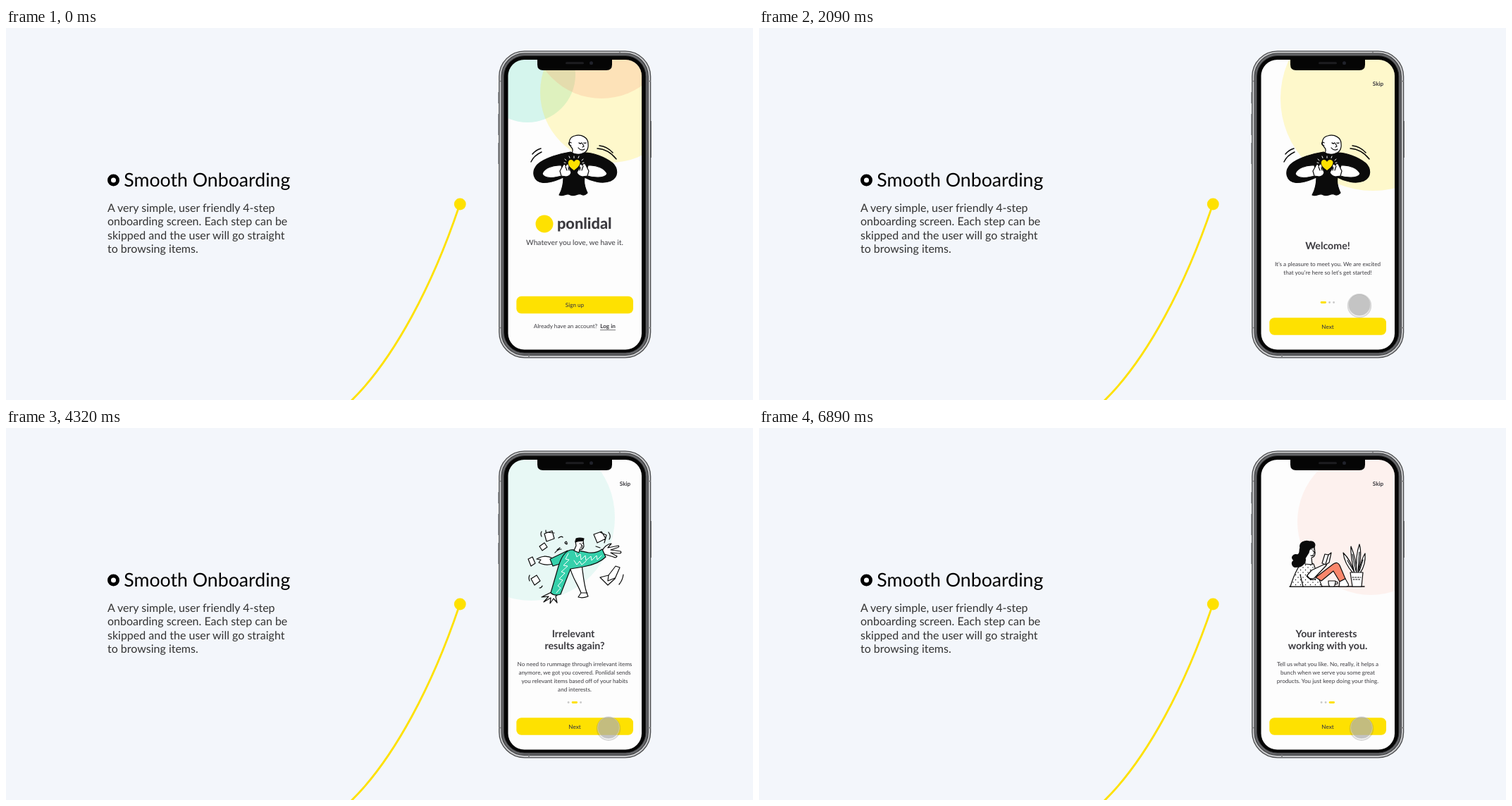
These frames come from a looping animation (1060 by 528 pixels, 8000 ms). An HTML page:

```html
<!DOCTYPE html>
<html lang="en">
<head>
<meta charset="utf-8">
<title>Smooth Onboarding</title>
<style>
  html, body { margin: 0; width: 100%; height: 100%; overflow: hidden; background: #f3f6fb; }
  svg { display: block; width: 1060px; height: 528px; font-family: Lato, "Open Sans", sans-serif; text-rendering: geometricPrecision; }
  .title { font-size: 26.7px; }
  .intro { font-size: 16px; fill: #333; }
  .screen text { fill: #3c3b40; text-anchor: middle; }
  .head { font-size: 14.2px; font-weight: 700; }
  .body { font-size: 8.15px; }
  .small { font-size: 8.15px; font-weight: 500; }
  .bold { font-size: 8.15px; font-weight: 700; }
  .art { fill: none; stroke: #0b0b0b; stroke-width: 1.2; stroke-linecap: round; stroke-linejoin: round; }
  .art .ink { fill: #0b0b0b; }
  .art .paper { fill: #fff; }
  .art .green { fill: #35d0ab; }
  .art .coral { fill: #f9866b; }
  .art .chalk { stroke: #fff; stroke-width: 1; }
</style>
</head>
<body>
<svg viewBox="0 0 1060 528">
  <defs>
    <clipPath id="glass"><rect x="712.5" y="45" width="189.5" height="411.5" rx="23"/></clipPath>
    <pattern id="spots" width="7" height="7" patternUnits="userSpaceOnUse">
      <rect width="7" height="7" fill="#fff"/>
      <circle cx="2" cy="2" r=".75" fill="#0b0b0b"/><circle cx="5.5" cy="5.5" r=".75" fill="#0b0b0b"/>
    </pattern>
  </defs>

  <rect width="1060" height="528" fill="#f3f6fb"/>
  <circle cx="152.5" cy="216" r="6" fill="#fff" stroke="#000" stroke-width="5"/>
  <text class="title" x="167.3" y="225.2">Smooth Onboarding</text>
  <g class="intro">
    <text x="144" y="261">A very simple, user friendly 4-step</text>
    <text x="144" y="280.3">onboarding screen. Each step can be</text>
    <text x="144" y="299.7">skipped and the user will go straight</text>
    <text x="144" y="319">to browsing items.</text>
  </g>
  <path d="M490 529C551 469 606 364 644 250" fill="none" stroke="#fee101" stroke-width="2.8"/>
  <circle cx="644.3" cy="250" r="8.4" fill="#fee101"/>

  <!-- phone body -->
  <g fill="none">
    <path d="M699 91v16M699 122v30M699 163v30M915.3 132v52" stroke="#6d6e72" stroke-width="1.2"/>
    <rect x="699.8" y="32.8" width="214.8" height="435" rx="36" fill="#c9cacc" stroke="#4a4b4d" stroke-width="1.3"/>
    <rect x="703.2" y="36.2" width="208" height="428.2" rx="32.5" fill="#66676a" stroke="#3c3d3f" stroke-width="1.2"/>
    <path d="M699 75.5h4M699 425.5h4M911 75.5h4M911 425.5h4M871 32v4M742 464v4" stroke="#77787a" stroke-width="1.5"/>
    <rect x="706.6" y="39.6" width="201.2" height="421.4" rx="29" fill="#050505" stroke="#2a2a2b"/>
  </g>

  <g class="screen" clip-path="url(#glass)">
    <rect x="712" y="45" width="191" height="412" fill="#fdfdfd"/>
    <circle class="splash" cx="740" cy="66" r="68" fill="#35d0ab" fill-opacity=".2"/>
    <circle id="blob"/>
    <circle class="splash" cx="845" cy=".5" r="99.5" fill="#f9866b" fill-opacity=".2"/>

    <!-- hugging man -->
    <g class="art">
      <path class="paper" d="M803 178C805 174 804 171 802 169C797 164 799 155 807 153C817 150 826 156 826 164C827 172 823 177 818 178L812 181Z"/>
      <path d="M802 163C798 160 797 166 802 167M813 163q2 2 4 0M820 163q2 1 3 0M818 164l2 4-2 1M812 170q4 5 9 2"/>
      <path class="ink" d="M801 176C788 178 764 184 754 194C745 204 748 218 762 219.5C775 220 785 214 791 212C791 221 789 230 785 237C792 240 795 233 801 237C807 240 811 234 816 236C819 238 822 237 825 234C821 226 820 217 821 212C830 217 846 222 858 217C870 211 868 199 861 192C850 183 832 177 822 177C815 180 807 180 801 176Z"/>
      <path class="paper" d="M761 207C763 199 776 194 788 195L792 209C781 212 765 216 761 207ZM853 207C850 199 838 194 826 195L821 209C831 212 849 215 853 207Z"/>
      <path class="paper" d="M786 203L791 194Q794 192 794 196L796 193Q799 193 799 197L802 205Q801 210 795 211L788 210ZM827 203L822 193Q819 191 818 195L816 193Q813 193 814 198L810 205Q812 210 818 211L825 210Z"/>
      <path d="M794 197l2 5M798 198l1 4M819 196l-2 6M815 198l-1 4"/>
      <path d="M806 202C801 198 797 195 798 190C799 186 804 186 806 190C808 186 813 186 814.5 190C815 195 810 199 806 202Z" fill="#fee101" stroke="none"/>
      <path class="chalk" d="M793 186l2 2M799 182l1 2.5M806 182v2.5M813 182l-1 2.5M819 186l-2 2M792 191l2 .5M820 191l-2 .5"/>
      <path stroke-width="1.5" d="M747 179Q752 173 759 171M745 190Q749 181 760 176M842 167Q853 168 861 177M839 171Q855 172 866 186"/>
    </g>

    <!-- man among flying papers -->
    <g class="art">
      <path class="paper" d="M764 150l11-4 3 11-11 4zM767 148l11 1M757 168l7-5 4 6-7 5zM741 186l6-3 4 9-6 4zM745 214l8-5 5 8-8 6zM834 151l11-4 6 10-12 6zM843 148l9 4-3 11M843 212l12-3 10-13 6 2-7 16-10 9z"/>
      <path d="M855 209l-1 8 10-4M766 148v-3M760 147q-2 3 0 7M855 148q4 5 1 10M837 168l6 2M784 156q4-3 6-1M743 209q-2 4 0 8M757 227q3 0 4-3M793 163q2-4 3 0t-3 0M876 208q-1 8-6 14M779 177q4-5 9-5M782 173l4-3"/>
      <path class="paper" d="M800 196C802 210 811 221 816 234L812 240Q818 242 826 239L824 234C820 222 819 208 817 194ZM817 234l8 0"/>
      <path class="paper" d="M776 185Q766 180 757 184l-4 2 6 1-3 4q9 5 20 2ZM846 174Q851 165 859 164l-5 6 15-3q2 2-2 3l-9 3 14 2q2 2-1 3l-13-1 9 5q-1 3-5 1l-13-4Z"/>
      <path class="paper" d="M776 232L760 240l10-1-7 8 10-6-1 8 5-7 5 6-2-9 4-4Z"/>
      <path class="green" d="M797 174L772 186L776 196L795 190Z"/>
      <path class="green" d="M801 173C810 172 820 176 827 177Q838 178 846 172L851 183C842 192 831 195 819 197L801 200L787 236Q778 239 773 234L784 196Q790 176 801 173Z"/>
      <path class="chalk" d="M798 178l-4 8 5 1-8 8 6 1-9 8 5 2-8 8 5 2-7 8 4 3-6 7M808 177l2 6 5-4 1 8 6-6 1 7 7-6 1 6 7-7 1 6 6-6M806 188l4 6 4-5 3 5 6-5"/>
      <path class="paper" d="M808 160L819 159L820 168Q818 174 814 172L813 177L806 174L809 167Z"/>
      <path class="ink" d="M808 162L809 157Q814 155 820 157L819 160L811 161Z"/>
      <path d="M814 164h1M818 163.5h.5M816 165l2 3-2 0M815 170h3"/>
    </g>

    <!-- reading woman -->
    <g class="art">
      <path d="M753 225H859" stroke-width="1.5"/>
      <path d="M769 192C762 202 757 215 754 225H799C795 216 791 204 787 193Q778 188 769 192Z" fill="url(#spots)"/>
      <path class="paper" d="M773 178L775 193L785 194L784 184Q789 183 789 178L788 167L778 166Z"/>
      <path class="ink" d="M768 170C766 162 775 159 781 161C788 160 791 166 787 170C783 170 781 171 780 177L775 185C777 191 770 198 764 197C757 199 754 191 759 188C754 184 758 178 764 180C769 178 766 174 768 170Z"/>
      <path d="M783 172h2M787 172h1M786 174l3 3-2 1M783 181q2 1 4-1"/>
      <path class="coral" d="M790 212L815 193Q821 189 824 195L832 214L824 218L815 203L798 217Z"/>
      <path class="paper" d="M824 218l8-4 4 7q2 4-3 4h-10ZM784 202L801 194L807 189L805 195L788 213Q780 216 778 209Z"/>
      <path class="paper" d="M799 192l4-13 5 1 4-3-3 14-5 3Z"/>
      <path d="M808 180l-4 13M768 208l4 17M777 210q7 8 13 4"/>
      <path class="paper" d="M808 217h10q0 8-3 8h-5q-2-1-2-8ZM818 218q4 0 3 3l-4 1"/>
      <path class="paper" d="M843 206C835 197 830 187 829 177C836 184 842 195 845 206C842 193 839 180 840 168C845 180 848 193 848 206C847 190 848 176 852 165C856 179 852 194 850 206C853 194 856 184 860 178C861 190 857 200 853 206Z"/>
      <path d="M844 203l-9-15M847 203l-5-24M850 203l2-27M852 203l5-16"/>
      <path class="paper" d="M839 205H857L855 225H842Z"/>
      <path d="M842 212h12M843 215h11" stroke-dasharray="2 1.8"/>
    </g>

    <g class="page">
      <circle cx="764" cy="278" r="12.5" fill="#fee101"/>
      <text x="820.8" y="285" font-size="21.8" font-weight="800">ponlidal</text>
      <text x="807" y="307.8" font-size="10.25">Whatever you love, we have it.</text>
      <text class="body" x="794" y="426.3">Already have an account?</text>
      <text class="bold" x="854" y="426.3">Log in</text>
      <path d="M843 428.6h22" stroke="#3c3b40" stroke-width=".7"/>
    </g>
    <g class="page">
      <text class="head" x="807" y="313.5">Welcome!</text>
      <g class="body">
        <text x="807" y="337.7">It’s a pleasure to meet you. We are excited</text>
        <text x="807" y="349.8">that you’re here so let’s get started!</text>
      </g>
    </g>
    <g class="page">
      <g class="head">
        <text x="805" y="297">Irrelevant</text>
        <text x="807" y="313.5">results again?</text>
      </g>
      <g class="body">
        <text x="807" y="337.7">No need to rummage through irrelevant items</text>
        <text x="807" y="349.8">anymore, we got you covered. Ponlidal sends</text>
        <text x="807" y="361.9">you relevant items based off of your habits</text>
        <text x="807" y="374">and interests.</text>
      </g>
    </g>
    <g class="page">
      <g class="head">
        <text x="805" y="297">Your interests</text>
        <text x="807" y="313.5">working with you.</text>
      </g>
      <g class="body">
        <text x="807" y="337.7">Tell us what you like. No, really, it helps a</text>
        <text x="807" y="349.8">bunch when we serve you some great</text>
        <text x="807" y="361.9">products. You just keep doing your thing.</text>
      </g>
    </g>

    <text id="skip" class="bold" x="878.5" y="82.3">Skip</text>
    <g id="button">
      <rect x="724.3" y="380.8" width="165.7" height="24.4" rx="7" fill="#fee101"/>
      <text id="signUp" class="small" x="807" y="396">Sign up</text>
      <text id="next" class="small" x="807" y="396">Next</text>
    </g>
  </g>

  <path d="M754 44H860V52Q860 60 852 60H762Q754 60 754 52Z" fill="#050505"/>
  <rect x="794" y="48.3" width="26" height="3" rx="1.5" fill="#1d1d20"/>
  <circle cx="830.5" cy="49.8" r="2.5" fill="#20222b"/>

  <g id="cursor">
    <circle cy="1.2" r="16.3" fill="none" stroke="#777" stroke-opacity=".28" stroke-width="1.8"/>
    <circle id="idle" r="15.6" fill="#aeaeae" fill-opacity=".73" stroke="#fff" stroke-opacity=".3" stroke-width=".8"/>
    <g id="pressed">
      <circle r="12.3" fill="none" stroke="#a8a278" stroke-opacity=".85" stroke-width="6.4"/>
      <circle r="9.2" fill="#d8c61c"/>
    </g>
  </g>
</svg>
<script>
  const LOOP = 8000;
  const SLIDE = 190;
  const SWITCHES = [1640, 3895, 6465];
  const SWITCH_TIME = 300;
  const PRESSES = [[1540, 1640], [3790, 3940], [6360, 6510]];
  const BLOBS = [ // cx, cy, r, opacity, red, green, blue
    [858, 91, 100, .2, 254, 225, 1],
    [871, 100, 131, .2, 254, 225, 1],
    [746, 127, 118, .1, 53, 208, 171],
    [868, 133, 104, .1, 249, 134, 107]
  ];

  const $ = id => document.getElementById(id);
  const all = selector => [...document.querySelectorAll(selector)];
  const clamp = v => Math.min(1, Math.max(0, v));
  const mix = (a, b, p) => a + (b - a) * p;
  const ease = (t, start, length) => {
    const p = clamp((t - start) / length);
    return p * p * (3 - 2 * p);
  };
  const set = (el, attrs) => {
    for (const name in attrs) el.setAttribute(name, attrs[name]);
  };

  const pages = all('.page'), arts = all('.art'), splashes = all('.splash');

  // Each onboarding page has three markers, the active one being a pill.
  pages.slice(1).forEach((page, active) => {
    let x = 796.7;
    for (let i = 0; i < 3; i++) {
      const width = i === active ? 8.3 : 2.8;
      const marker = document.createElementNS('http://www.w3.org/2000/svg', 'rect');
      set(marker, { x, y: 388, width, height: 2.9, rx: 1.4, fill: i === active ? '#fee101' : '#c9c9c9' });
      page.append(marker);
      x += width + 3.2;
    }
  });

  function drawBlob(step) {
    const from = Math.min(2, Math.floor(step));
    const [cx, cy, r, opacity, ...rgb] = BLOBS[from].map((v, i) => mix(v, BLOBS[from + 1][i], step - from));
    set($('blob'), { cx, cy, r, opacity, fill: `rgb(${rgb.map(Math.round)})` });
  }

  function drawCursor(t) {
    const enter = ease(t, 760, 570), down = ease(t, 2510, 490);
    const x = mix(884, 852, enter) + 3 * down - 4 * Math.sin(Math.PI * down);
    const y = mix(441, 393, enter) + 32.5 * down;
    const press = PRESSES.some(([start, end]) => t >= start && t < end);
    set($('cursor'), { transform: `translate(${x} ${y})`, opacity: clamp((t - 760) / 200) });
    set($('idle'), { opacity: press ? 0 : 1 });
    set($('pressed'), { opacity: press ? 1 : 0 });
  }

  function draw(t) {
    const step = SWITCHES.reduce((sum, start) => sum + ease(t, start, SWITCH_TIME), 0);
    const first = clamp(step);
    pages.forEach((page, i) => set(page, { opacity: clamp(1 - Math.abs(step - i)) }));
    arts.forEach((art, i) => {
      const offset = i + 1 - Math.max(1, step);
      set(art, { transform: `translate(${offset * SLIDE} 0)` });
    });
    splashes.forEach(splash => set(splash, { opacity: 1 - first }));
    set($('skip'), { opacity: first });
    set($('button'), { transform: `translate(0 ${30.5 * first})` });
    set($('signUp'), { opacity: 1 - first });
    set($('next'), { opacity: first });
    drawBlob(step);
    drawCursor(t);
  }

  const begin = performance.now();
  function tick() {
    draw((performance.now() - begin) % LOOP);
    requestAnimationFrame(tick);
  }
  tick();
</script>
</body>
</html>
```
